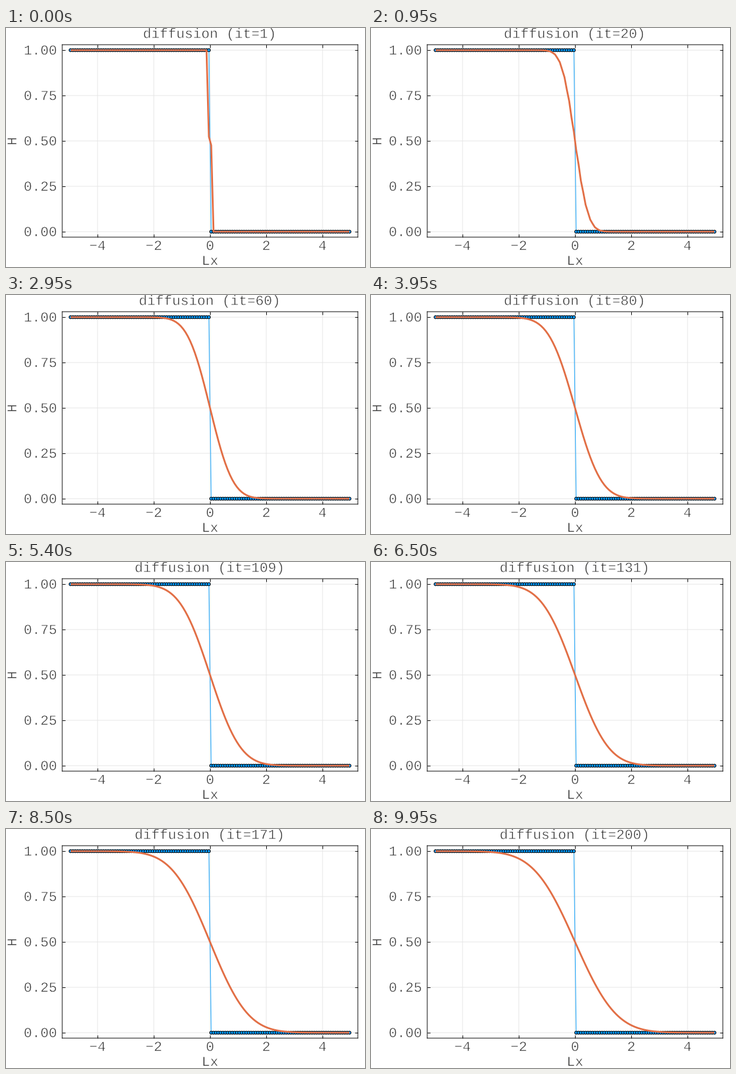
These frames come from a looping animation (600 px wide and 400 px high, 10000 ms). A matplotlib script:

```python
import numpy as np
import matplotlib.pyplot as plt
from matplotlib.animation import FuncAnimation
from matplotlib.patheffects import Stroke

W, H, DPI = 600, 400, 100
PT = 72 / DPI                 # points per pixel
STEPS, INTERVAL = 200, 50

# stage pixels of the data origin, and pixels per data unit
X0, Y0, SX, SY = 341, 340.9, 47, 303.8
FONT_PX = 23.2
ADVANCE = 0.6 * FONT_PX       # width of one monospaced character
INK = "#303030"
BLUE, ORANGE = "#009afa", "#e26f46"

# a white outline on top of the letters makes their strokes thinner
THIN = [Stroke(linewidth=0.6 * PT, foreground="white")]

plt.rcParams.update({
    "font.family": "Liberation Mono",
    "font.size": FONT_PX * PT,
    "text.color": INK,
    "text.hinting": "none",
    "axes.linewidth": PT,
    "path.snap": False,
})

# explicit diffusion of a step profile
LX, NX = 10.0, 120
dx = LX / NX
x = np.linspace(-LX / 2 + dx / 2, LX / 2 - dx / 2, NX)
start = np.where(x < 0, 1.0, 0.0)


def diffuse(h):
    new = h.copy()
    new[1:-1] += np.diff(h, 2) / 2.1
    return new


states = [diffuse(start)]
for _ in range(STEPS - 1):
    states.append(diffuse(states[-1]))

fig = plt.figure(figsize=(W / DPI, H / DPI), dpi=DPI, facecolor="white")

# limits are the data range plus 3% on each side
pad_x, pad_y = 0.03 * (x[-1] - x[0]), 0.03
xlim = (x[0] - pad_x, x[-1] + pad_x)
ylim = (-pad_y, 1 + pad_y)
ax = fig.add_axes([
    (X0 + SX * xlim[0]) / W,
    1 - (Y0 - SY * ylim[0]) / H,
    SX * (xlim[1] - xlim[0]) / W,
    SY * (ylim[1] - ylim[0]) / H,
])
ax.set(xlim=xlim, ylim=ylim)
ax.set_axisbelow(True)

xticks = [-4, -2, 0, 2, 4]
yticks = [0, 0.25, 0.5, 0.75, 1]
ax.set_xticks(xticks)
ax.set_yticks(yticks)
ax.tick_params(direction="in", top=True, right=True, length=5 * PT,
               width=PT, labelbottom=False, labelleft=False)
ax.grid(color="#e6e6e6", linewidth=PT)


def left_of(text, center):
    return (center - len(text) * ADVANCE / 2) / W


def label(text, center, baseline):
    return fig.text(left_of(text, center), 1 - baseline / H, text,
                    ha="left", va="baseline", path_effects=THIN)


for t in xticks:
    label(str(t).replace("-", "\u2212"), X0 + SX * t, 371.5)
for t in yticks:
    label(f"{t:.2f}", 57.4, Y0 - SY * t + 7.5)
label("Lx", X0, 396.5)
fig.text(17 / W, 1 - 189 / H, "H", rotation=90, rotation_mode="anchor",
         ha="center", va="baseline", path_effects=THIN)
title = label("", X0 - 0.7, 16.7)

ax.plot(x, start, color=BLUE, linewidth=PT, zorder=3)
# one size per dot keeps every dot at its exact subpixel place
ax.scatter(x, start, s=np.full(NX, (5.2 * PT) ** 2), color=BLUE,
           edgecolors="black", linewidths=PT, zorder=3.5)
curve, = ax.plot(x, states[0], color=ORANGE, linewidth=3 * PT,
                 solid_capstyle="butt", zorder=4)


def draw(i):
    text = f"diffusion (it={i + 1})"
    title.set_text(text)
    title.set_x(left_of(text, X0 - 0.7))
    curve.set_ydata(states[i])
    return title, curve


anim = FuncAnimation(fig, draw, frames=STEPS, interval=INTERVAL,
                     repeat=True, repeat_delay=0)
plt.show()
```
